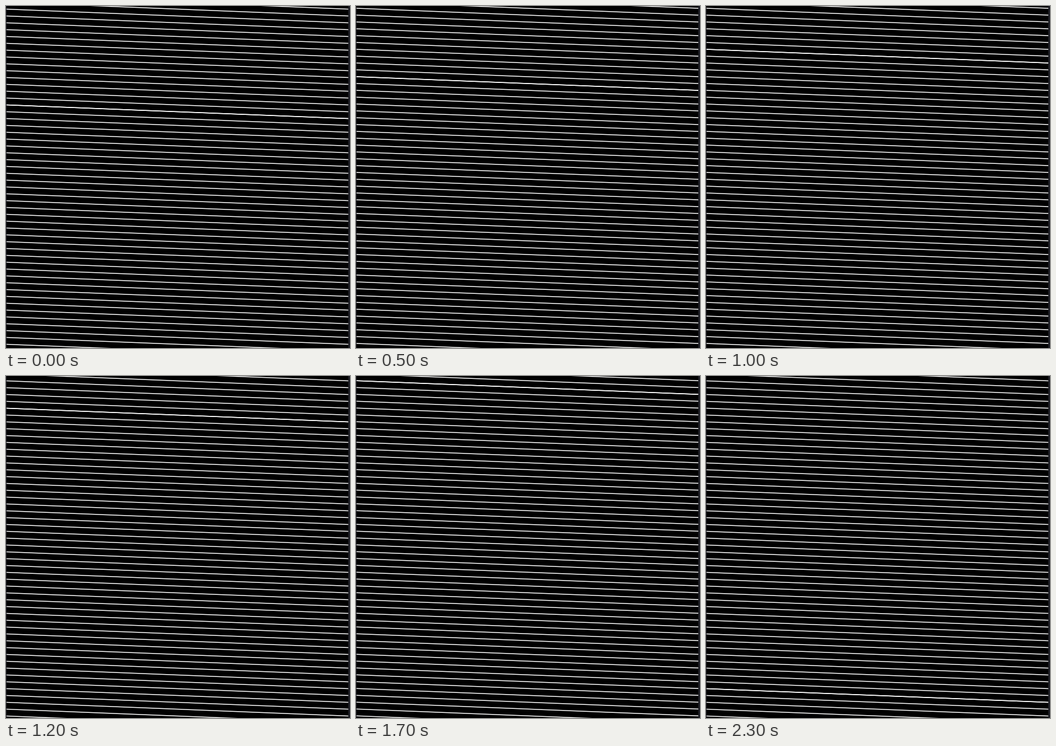
These frames come from a looping animation (603 px wide and 600 px high, 2400 ms). An HTML page with a canvas:

```html
<!DOCTYPE html>
<html>
<head>
<meta charset="utf-8">
<style>
  html, body { margin: 0; width: 100%; height: 100%; overflow: hidden; background: #1e1f26; }
  canvas { display: block; }
</style>
</head>
<body>
<canvas id="stage" width="603" height="600"></canvas>
<script>
const ctx = document.getElementById('stage').getContext('2d');
const LOOP = 2400, STEP = 100, GAP = 12, COUNT = 50, DROP = 24;
const LEFT = 1, RIGHT = 600, HEIGHT = 600;

// [step, height of the seam where the two sheets of lines overlap]
const path = [[0, 173.4], [5, 124], [7, 106], [10, 76], [14, 37], [19, -11], [23, -51.6]];

function seamAt(step) {
  const i = path.findIndex(p => p[0] >= step);
  const [t1, y1] = path[i], [t0, y0] = path[Math.max(i - 1, 0)];
  const y = t1 === t0 ? y1 : y0 + (y1 - y0) * (step - t0) / (t1 - t0);
  return y <= -11 ? y + GAP * COUNT : y; // the roll starts over
}

function drawSheet(top) {
  for (let i = 0; i < COUNT; i++) {
    const y = top + i * GAP;
    if (y < -DROP - 2 || y > HEIGHT + 2) continue;
    ctx.beginPath();
    ctx.moveTo(LEFT, y);
    ctx.lineTo(RIGHT, y + DROP);
    ctx.stroke();
  }
}

function frame() {
  const seam = seamAt(Math.floor(performance.now() % LOOP / STEP));
  ctx.fillStyle = '#1e1f26';
  ctx.fillRect(0, 0, 603, HEIGHT);
  ctx.fillStyle = '#000';
  ctx.fillRect(LEFT, 0, RIGHT - LEFT, HEIGHT);
  ctx.strokeStyle = '#fff';
  ctx.lineWidth = 1.5;
  drawSheet(seam - GAP * (COUNT - 1));
  drawSheet(seam);
  requestAnimationFrame(frame);
}
frame();
</script>
</body>
</html>
```
